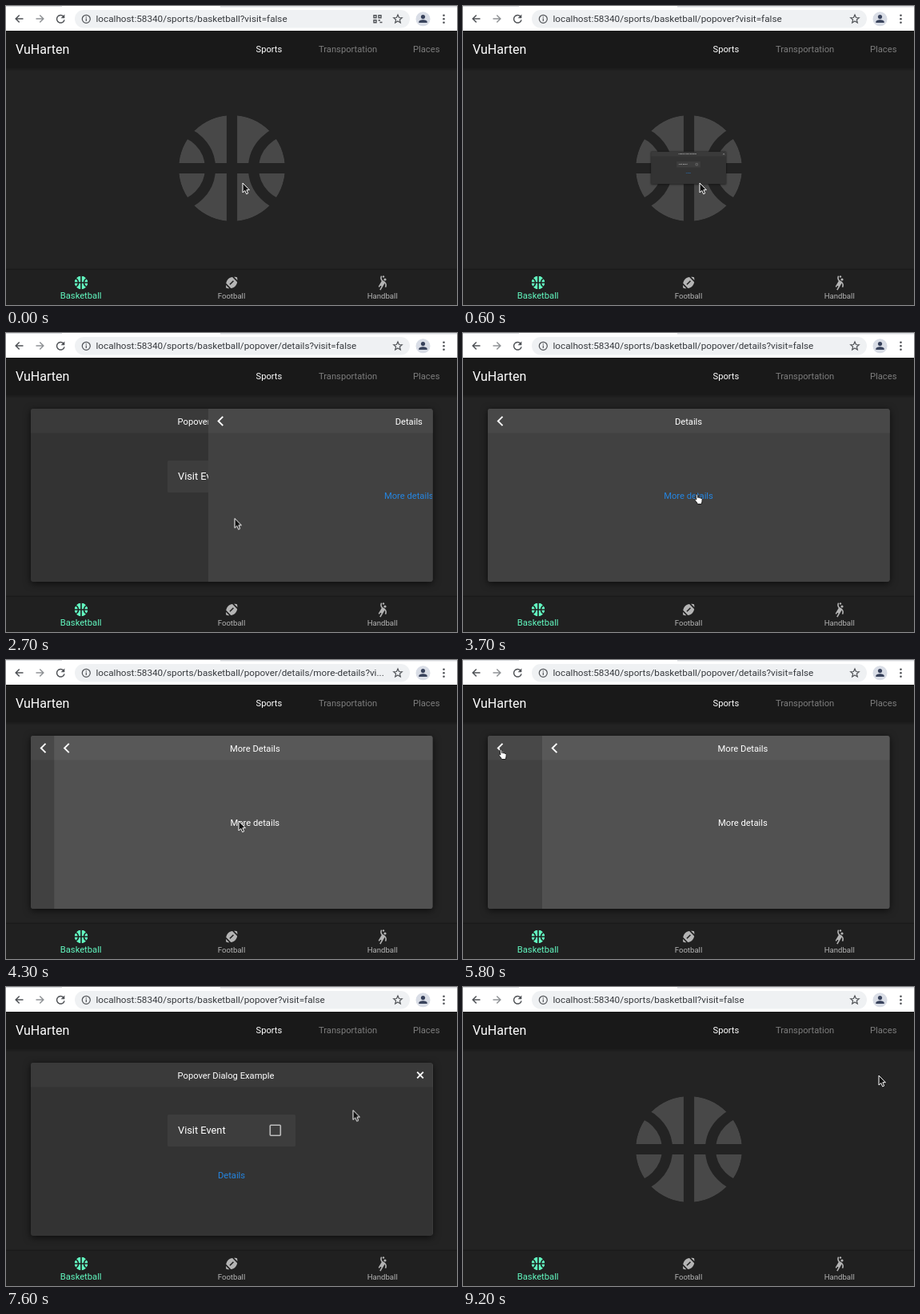
Recreate the animation shown at these times as an HTML page. Size 564 by 375 pixels, loop 9.3 s.

```html
<!DOCTYPE html>
<html lang="en">
<head>
<meta charset="utf-8">
<title>Nested routes</title>
<style>
html, body { margin: 0; width: 100%; height: 100%; overflow: hidden; background: #232323; }
svg { display: block; width: 564px; height: 375px; }
text { font: 11.2px Roboto, sans-serif; fill: #fff; }
.mid { text-anchor: middle; }
.brand { font-size: 16px; }
.dim { fill: #7d7d7d; }
.link { fill: #2585e0; }
.small { font-size: 9.6px; fill: #b4b4b4; }
.url text { font-size: 11.73px; fill: #36393d; }
.line { fill: none; stroke: #fff; stroke-width: 1.9; }
.tool { fill: none; stroke: #505357; stroke-width: 1.5; }

/* The clock script sets --t in milliseconds. */
.anim, .step {
  animation: 9300ms ease-in-out infinite paused;
  animation-delay: calc(var(--t, 0) * -1ms);
}
.step { animation-timing-function: step-end; }

.dialog { animation-name: dialog; transform-origin: 282px 203px; }
.details { animation-name: details; }
.more { animation-name: more; }
.cursor { animation-name: cursor; }
.arrow { animation-name: arrow; }
.hand { animation-name: hand; }
.home { animation-name: home; }
.grid { animation-name: grid; }
.popover { animation-name: popover; }
.deep { animation-name: deep; }
.deeper { animation-name: deeper; }

@keyframes dialog {
  0%, 4.84%, 96.24%, 100% { transform: scale(0); }
  10.22%, 90.86% { transform: scale(1); }
}
@keyframes details {
  0%, 26.16%, 74.19%, 100% { transform: translateX(502px); }
  31.54%, 68.82% { transform: translateX(0); }
}
@keyframes more {
  0%, 41.77%, 66.37%, 100% { transform: translateX(502px); }
  47.15%, 60.99% { transform: translateX(0); }
}
@keyframes cursor {
  0%, 12.9% { transform: translate(296px, 222px); }
  18.28%, 33.33% { transform: translate(286px, 232.5px); }
  37.63%, 50.5% { transform: translate(291px, 202px); }
  58.06% { transform: translate(46px, 112px); }
  76.34% { transform: translate(46px, 112px); animation-timing-function: ease-in; }
  81.72% { transform: translate(434px, 154.5px); animation-timing-function: ease-out; }
  86%, 100% { transform: translate(520px, 111px); }
}
@keyframes hand {
  0%, 28.5%, 44.6%, 69.9%, 92%, 100% { opacity: 0; }
  17.7%, 37.1%, 57.5%, 85.5% { opacity: 1; }
}
@keyframes arrow {
  0%, 28.5%, 44.6%, 69.9%, 92%, 100% { opacity: 1; }
  17.7%, 37.1%, 57.5%, 85.5% { opacity: 0; }
}
@keyframes home { 0%, 90.86%, 100% { opacity: 1; } 4.84% { opacity: 0; } }
@keyframes grid { 0% { opacity: 1; } 4.84%, 100% { opacity: 0; } }
@keyframes popover { 0%, 26.16%, 90.86%, 100% { opacity: 0; } 4.84%, 68.82% { opacity: 1; } }
@keyframes deep { 0%, 41.77%, 68.82%, 100% { opacity: 0; } 26.16%, 60.99% { opacity: 1; } }
@keyframes deeper { 0%, 60.99%, 100% { opacity: 0; } 41.77% { opacity: 1; } }
</style>
</head>
<body>
<svg viewBox="0 0 564 375">
  <defs>
    <mask id="seams" maskUnits="userSpaceOnUse" x="-70" y="-70" width="140" height="140">
      <circle r="66.5" fill="#fff"/>
      <g fill="none" stroke="#000" stroke-width="13.2">
        <path d="M-70 0H70M0-70V70"/>
        <circle cx="-75" r="48"/>
        <circle cx="75" r="48"/>
      </g>
    </mask>
    <g id="ball"><circle r="66.5" fill="currentColor" mask="url(#seams)"/></g>
    <path id="back" class="line" d="M49.5 104.8L43.8 110.5L49.5 116.2"/>
    <clipPath id="frame"><rect x="31" y="95" width="502.5" height="217" rx="3"/></clipPath>
    <clipPath id="page"><path d="M0 77H564V330H0Z"/></clipPath>
    <linearGradient id="shade" x2="0" y2="1">
      <stop stop-color="#000" stop-opacity=".3"/>
      <stop offset="1" stop-color="#000" stop-opacity="0"/>
    </linearGradient>
  </defs>

  <!-- page -->
  <path fill="#232323" d="M0 31H564V375H0Z"/>
  <use href="#ball" transform="translate(282.5 203.5)" color="#484848"/>
  <path fill="url(#shade)" d="M0 77H564V82H0Z"/>

  <g clip-path="url(#page)">
    <g class="anim dialog">
      <rect x="31" y="95" width="502.5" height="217" rx="3" fill="#333" style="filter:drop-shadow(0 2px 5px #000a)"/>
      <g clip-path="url(#frame)">
        <path fill="#3a3a3a" d="M31 95H534V125.5H31Z"/>
        <text class="mid" x="275" y="114.5">Popover Dialog Example</text>
        <path class="line" stroke-width="1.7" d="M514.2 106.7L521.8 114.3M521.8 106.7L514.2 114.3"/>
        <rect x="202" y="160" width="160" height="40" rx="1.5" fill="#3d3d3d"/>
        <text x="215" y="184.3" style="font-size:12.8px">Visit Event</text>
        <rect x="330.3" y="173.2" width="13" height="13" rx="1" fill="none" stroke="#bdbdbd" stroke-width="1.6"/>
        <text class="mid link" x="282" y="239.5">Details</text>

        <g class="anim details">
          <path fill="#414141" d="M31 95H534V312H31Z"/>
          <path fill="#484848" d="M31 95H534V125.5H31Z"/>
          <use href="#back"/>
          <text class="mid" x="282" y="114.5">Details</text>
          <text class="mid link" x="282" y="207.5">More details</text>
        </g>

        <g class="anim more">
          <path fill="#515151" d="M31 95H534V312H31Z"/>
          <path fill="#585858" d="M31 95H534V125.5H31Z"/>
          <use href="#back"/>
          <text class="mid" x="282" y="114.5">More Details</text>
          <text class="mid" x="282" y="207.5">More details</text>
        </g>
      </g>
    </g>
  </g>

  <!-- app bar -->
  <path fill="#191919" d="M0 31H564V77H0Z"/>
  <text class="brand" x="12" y="60">VuHarten</text>
  <text x="312.5" y="58">Sports</text>
  <text class="dim" x="391" y="58">Transportation</text>
  <text class="dim" x="509" y="58">Places</text>

  <!-- bottom bar -->
  <path fill="#202020" d="M0 330H564V375H0Z"/>
  <path fill="#1a1a1a" d="M0 329.5H564V331H0Z"/>
  <use href="#ball" transform="translate(94 347) scale(.126)" color="#62f8c0"/>
  <text class="mid" x="93.7" y="367" style="fill:#62f8c0">Basketball</text>
  <g fill="#b4b4b4">
    <path transform="translate(272.6 337.4) scale(.8)" d="M3.02 15.62c-.08 2.42.32 4.34.67 4.69s2.28.76 4.69.67zM13.08 3.28C10.75 3.7 8.29 4.62 6.46 6.46s-2.76 4.29-3.18 6.62l7.63 7.63c2.34-.41 4.79-1.34 6.62-3.18s2.76-4.29 3.18-6.62zM9.9 15.5l-1.4-1.4 5.6-5.6 1.4 1.4zM20.98 8.38c.08-2.42-.32-4.34-.67-4.69s-2.28-.76-4.69-.67z"/>
    <g transform="translate(461.2 337.4) scale(.8)">
      <circle cx="16" cy="7" r="2"/>
      <circle cx="13.5" cy="2.5" r="1.5"/>
      <path d="M15.84 10.41l-2.6-1.5c-2.38-1.38-3.2-4.44-1.82-6.82l-1.73-1C8.1 3.83 8.6 7.21 10.66 9.4l-5.15 8.92 1.73 1 1.5-2.6 1.73 1-3 5.2 1.73 1 6.29-10.89c1.14 1.55 1.33 3.69.31 5.46l1.73 1c1.6-2.75 1.28-6.58-1.69-9.08z"/>
    </g>
  </g>
  <text class="mid small" x="282" y="367">Football</text>
  <text class="mid small" x="470.7" y="367">Handball</text>

  <!-- browser toolbar -->
  <path fill="#fff" d="M0 0H564V31H0Z"/>
  <path fill="#d9dbdf" d="M0 0H70V1H0ZM268 0H564V1.5H268Z"/>
  <rect x="86" y="5" width="419" height="22.5" rx="11.2" fill="#eff1f3"/>
  <g class="tool">
    <path d="M21.5 16H12.5M16.7 11.5L12.2 16L16.7 20.5"/>
    <path stroke="#909396" d="M37.5 16H46.5M42.3 11.5L46.8 16L42.3 20.5"/>
    <path d="M72 13.2A4.8 4.8 0 1 0 73 17.3"/>
    <path fill="#505357" stroke="none" d="M73.3 10.5V15.2H68.6Z"/>
    <g stroke-width="1.2">
      <circle cx="100.3" cy="16.3" r="5"/>
      <path d="M100.3 15.6V19M100.3 13.3V14.5"/>
      <path d="M490 11L491.5 14.5L495.3 14.8L492.4 17.3L493.3 21L490 19L486.7 21L487.6 17.3L484.7 14.8L488.5 14.5Z"/>
    </g>
    <g class="step grid" stroke-width="1.4">
      <path d="M460 11.7h3v3h-3zM466 11.7h3v3h-3zM460 17.7h3v3h-3z"/>
      <path d="M465.5 18H468M467.5 20.5H470.5"/>
    </g>
  </g>
  <circle cx="521.5" cy="16.3" r="9" fill="#d9dde6"/>
  <g fill="#39435c">
    <circle cx="521.5" cy="13.6" r="2.6"/>
    <path d="M516.3 21V19.8C516.3 16.4 526.7 16.4 526.7 19.8V21Z"/>
  </g>
  <g fill="#505357">
    <circle cx="547.5" cy="11.8" r="1.3"/>
    <circle cx="547.5" cy="16.3" r="1.3"/>
    <circle cx="547.5" cy="20.8" r="1.3"/>
  </g>
  <g class="url">
    <text class="step home" x="112.5" y="20.3">localhost:58340/sports/basketball?visit=false</text>
    <text class="step popover" x="112.5" y="20.3">localhost:58340/sports/basketball/popover?visit=false</text>
    <text class="step deep" x="112.5" y="20.3">localhost:58340/sports/basketball/popover/details?visit=false</text>
    <text class="step deeper" x="112.5" y="20.3">localhost:58340/sports/basketball/popover/details/more-details?vi...</text>
  </g>

  <!-- pointer -->
  <g class="anim cursor" stroke-linejoin="round">
    <path class="step arrow" fill="#111" stroke="#fff" d="M0 0V12L2.8 9.5L4.7 13.8L6.7 12.9L4.9 8.7H8.4Z"/>
    <path class="step hand" fill="#fff" stroke="#111" stroke-width=".9" d="M.2 1C.2-.5 2.1-.5 2.2 1L2.6 4.6C3.2 3.7 4.4 4 4.6 5C5.3 4.3 6.3 4.7 6.5 5.6C7.4 5.1 8.2 5.7 8.2 6.7C8.3 9 7.6 10.3 7.3 12.5H2.4C1.8 10.5-.2 9-1 7.3C-1.4 6.2-.2 5.8.9 7.1Z"/>
  </g>
</svg>
<script>
const LOOP = 9300, STEP = 100, LAG = 20;
const root = document.documentElement;

// Hold each pose for one step, like a ten-per-second screen recording.
function tick() {
  const t = Math.floor((performance.now() + LAG) / STEP) * STEP % LOOP;
  root.style.setProperty('--t', t);
  requestAnimationFrame(tick);
}
tick();
</script>
</body>
</html>
```
